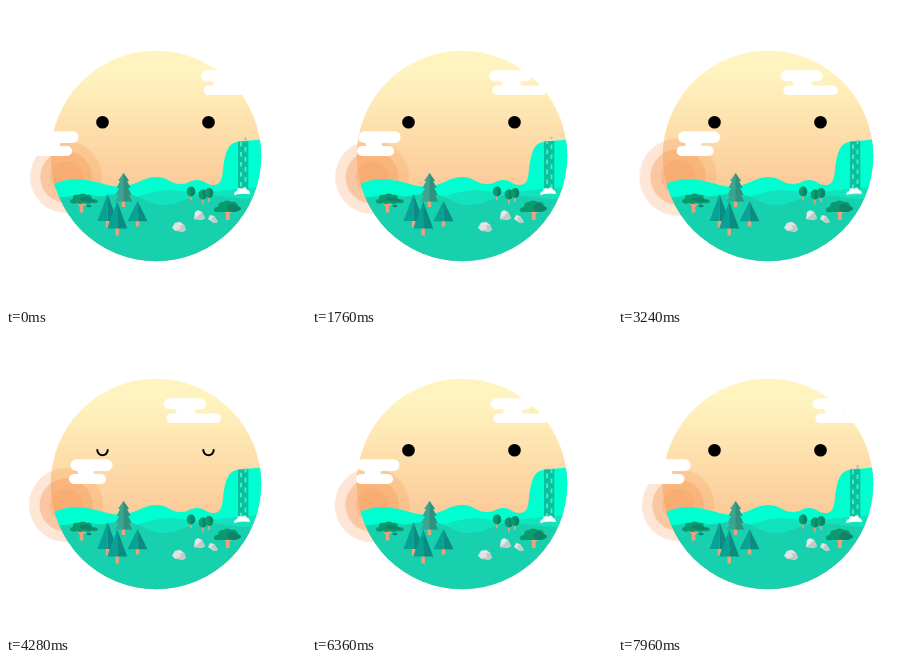
Recreate the animation shown at these times as an HTML page without scripts. Size 300 by 300 pixels, loop 8000 ms.

```html
<!DOCTYPE html>
<html lang="en">
<head>
<meta charset="utf-8">
<title>Sleepy valley</title>
<style>
html, body { margin: 0; width: 100%; height: 100%; overflow: hidden; background: #fff; }
svg { display: block; width: 100%; height: 100%; }

.sun { transform-origin: 60px 171px; animation: pulse 1s linear infinite alternate; }
.sun circle { fill: #f7a062; }
.cloud { fill: #fff; animation: drift 4s linear infinite alternate; }
.left { --dx: 36.5px; }
.right { --dx: -40px; }
.open { animation: awake 8s step-end infinite; }
.shut { fill: none; stroke: #000; stroke-width: 2; stroke-linecap: round; opacity: 0; animation: asleep 8s step-end infinite; }
.fall { fill: none; stroke: #5fe3c8; stroke-width: 1.8; stroke-dasharray: 4.5 5.5; animation: flow 1s linear infinite; }
.foam { transform-origin: 236px 188px; animation: splash 1s linear infinite alternate; }
.trunk { fill: none; stroke: #eda17d; }

@keyframes pulse { to { transform: scale(1.1); } }
@keyframes drift { to { transform: translateX(var(--dx)); } }
@keyframes awake { 0%, 56% { opacity: 1; } 51% { opacity: 0; } }
@keyframes asleep { 0%, 56% { opacity: 0; } 51% { opacity: 1; } }
@keyframes flow { to { stroke-dashoffset: -10px; } }
@keyframes splash { to { transform: scale(.97); } }
</style>
</head>
<body>
<svg viewBox="0 0 300 300">
  <defs>
    <linearGradient id="sky" gradientUnits="userSpaceOnUse" x1="0" y1="45" x2="0" y2="185">
      <stop offset=".15" stop-color="#fff4bf"/>
      <stop offset="1" stop-color="#fbc897"/>
    </linearGradient>
    <clipPath id="globe"><circle cx="150" cy="150" r="105.3"/></clipPath>

    <g id="fir">
      <path class="trunk" stroke-width="3.4" d="M0 17V34"/>
      <path fill="#08a294" d="M0 0L-10 27H0Z"/>
      <path fill="#0b8b82" d="M0 0L10 27H0Z"/>
    </g>
    <g id="bush">
      <path class="trunk" stroke-width="1.6" d="M0 3V9"/>
      <ellipse rx="4.2" ry="4.9" fill="#0a9a70"/>
      <path fill="#0b8467" d="M0-4.9A4.2 4.9 0 0 1 0 4.9Z"/>
    </g>
    <g id="acacia">
      <path class="trunk" stroke-width="3.6" d="M0 4V13.5"/>
      <path class="trunk" stroke-width="1.5" d="M0 8L-5 3M0 8L6 3"/>
    </g>
    <g id="rock">
      <path fill="#dfe3e2" d="M-7 1L-4-4L1-5L5-2L7 3L4 5L-4 4Z"/>
      <path fill="#c3cbc9" d="M1-1L5-2L7 3L4 5L-4 4L2 2Z"/>
    </g>
  </defs>

  <circle cx="150" cy="150" r="105.3" fill="url(#sky)"/>

  <g class="sun">
    <circle cx="60" cy="171" r="36" opacity=".26"/>
    <circle cx="60" cy="171" r="25.8" opacity=".45"/>
    <circle cx="60" cy="171" r="16" opacity=".3"/>
  </g>

  <g clip-path="url(#globe)">
    <path fill="#00ffd0" d="M40 182C56 172 72 172 86 175C101 178 106 182 119 180C133 178 138 171 150 171C162 171 164 178 175 178C183 178 184 174 191 174C199 174 200 179 207 179C216 179 216 171 217 164C219 148 221 136 234 135.5L260 133V260H40Z"/>
    <path fill="#10e3bd" d="M40 199C58 189 72 187 86 189C104 192 118 194 134 190C150 185 160 183 174 185C198 188 214 184 262 180V260H40Z"/>
    <path fill="#17d0ae" d="M40 192C60 190 76 193 91 191C105 189 112 186 126 189C140 193 144 199 158 199C177 199 184 187 205 189C222 190 236 195 262 192V260H40Z"/>
    <path fill="#06c3a0" d="M232 135.6L242.3 135V183H232Z"/>
    <path class="fall" d="M235 136V183"/>
    <path class="fall" d="M239.5 131V183"/>
  </g>
  <path class="foam" fill="#fff" d="M228 189C228 186 230 185 231 185C231 182 234 181 236 183C238 180 241 182 241 184C243 184 244 186 244 188Q236 187 228 189Z"/>

  <path class="trunk" stroke-width="3.2" d="M117.5 190V201"/>
  <path fill="#3ba592" d="M117.5 167L112 175H114L110.5 182H113L109.5 189H112L109 195.5H126L123 189H125.5L122 182H124.5L121 175H123Z"/>
  <path fill="#31917f" d="M117.5 167L123 175H121L124.5 182H122L125.5 189H123L126 195.5H117.5Z"/>

  <use href="#acacia" x="75.5" y="193"/>
  <path fill="#0a9a70" d="M64 196Q64 193 67 193Q66 188 72 189Q77 186 81 189Q86 188 86 193Q92 193 92 196Q90 198 85 197Q82 199 78 197Q73 199 71 197Q66 199 64 196Z"/>
  <path fill="#0b8467" d="M74 192Q80 189 85 193L91 195Q82 197 74 194Z"/>
  <ellipse cx="83" cy="200" rx="2.5" ry="1.3" fill="#0b8467"/>

  <use href="#fir" x="101.5" y="188"/>
  <use href="#fir" x="131.5" y="195" transform="translate(0 48.75) scale(1 .75)"/>
  <use href="#fir" x="111.2" y="195.5"/>

  <use href="#bush" x="185" y="185.5"/>
  <use href="#bush" x="196.8" y="188.5"/>
  <use href="#bush" x="203" y="187"/>

  <use href="#acacia" x="221.8" y="200.5"/>
  <path fill="#0a9a70" d="M208 204Q208 201 212 201Q212 196 217 196Q221 193 226 196Q231 195 232 200Q235 201 235 203Q232 206 227 206H213Q208 207 208 204Z"/>
  <path fill="#0b8467" d="M221 200Q226 195 231 200Q235 201 235 203Q232 206 227 206Q221 205 221 200Z"/>

  <use href="#rock" x="173" y="220.8"/>
  <path fill="#e4e8e7" d="M188 213L189 206L192 204L196 206L199 212L196 214Z"/>
  <path fill="#c3cbc9" d="M192 210L196 206L199 212L196 214L188 213Z"/>
  <path fill="#dfe3e2" d="M202 213L204 209L208 210L212 216L208 217Z"/>
  <path fill="#c3cbc9" d="M205 213L208 210L212 216L208 217Z"/>

  <g class="cloud left">
    <rect x="30.5" y="125.3" width="42" height="11.7" rx="5.8"/>
    <path d="M36 136H56Q53.500 136.800 53.500 138.500Q53.500 140.200 56 141H36Q38 140.200 38 138.500Q38 136.800 36 136Z"/>
    <rect x="29" y="140" width="37" height="10" rx="5"/>
  </g>
  <g class="cloud right">
    <rect x="195" y="64.300" width="42" height="11" rx="5.500"/>
    <path d="M205 74.500H229Q226 75.500 226 77.300Q226 79.200 229 80H205Q208 79.200 208 77.300Q208 75.500 205 74.500Z"/>
    <rect x="197.700" y="79.500" width="54.500" height="9.600" rx="4.800"/>
  </g>

  <g class="open">
    <circle cx="96.500" cy="116.300" r="6.300"/>
    <circle cx="202.500" cy="116.300" r="6.300"/>
  </g>
  <g class="shut">
    <path d="M91.300 116A5.200 5.200 0 0 0 101.700 116"/>
    <path d="M197.300 116A5.200 5.200 0 0 0 207.700 116"/>
  </g>
</svg>
</body>
</html>
```
